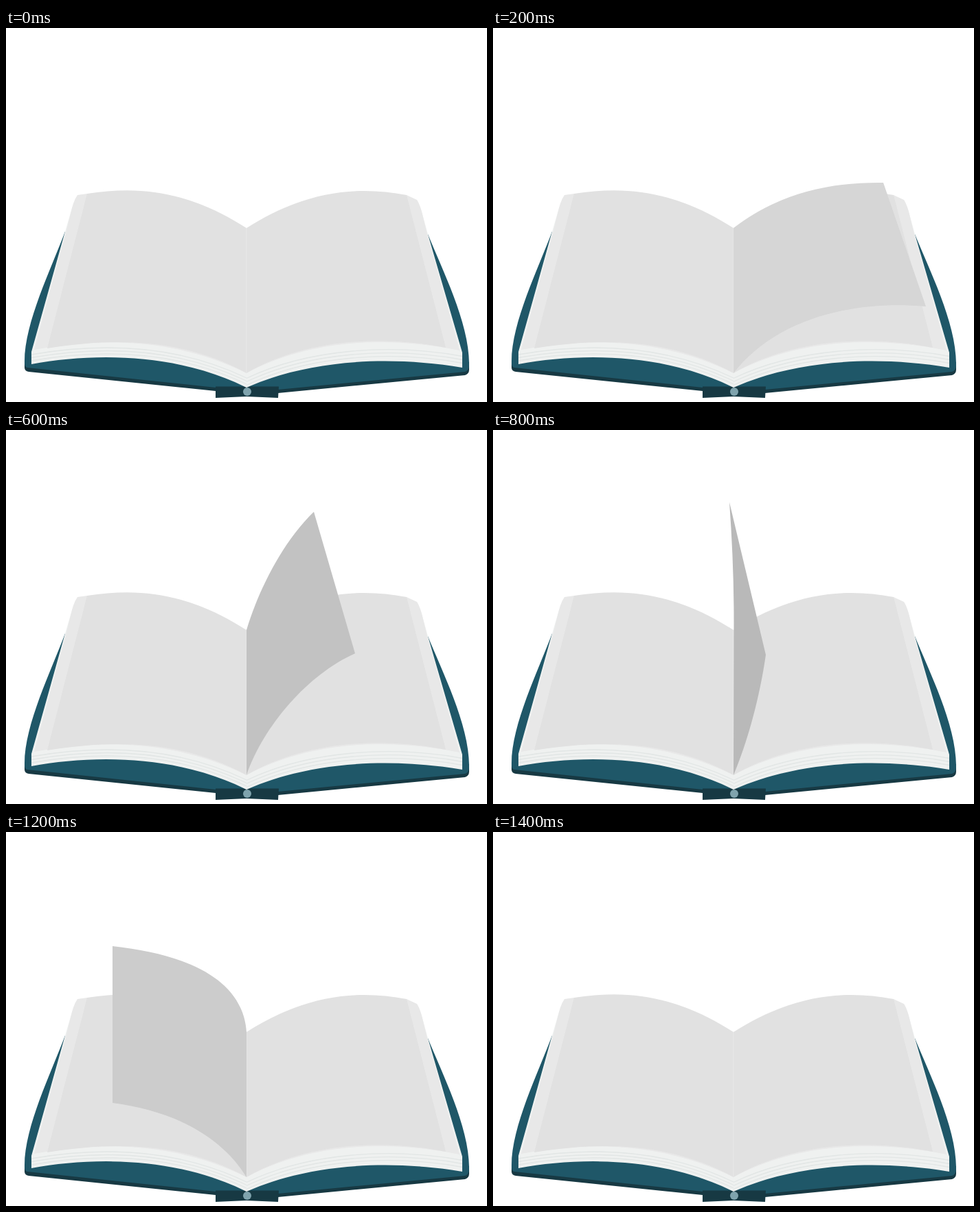
These frames come from a looping animation (700x544 px, 1600 ms). An HTML page without scripts:

```html
<!DOCTYPE html>
<html lang="en">
<head>
<meta charset="utf-8">
<title>Turning page</title>
<style>
  html, body { margin: 0; width: 100%; height: 100%; overflow: hidden; background: #fff; }
  svg { display: block; width: 100%; height: 100%; }
  .cover { fill: #1f5768; }
  .board { fill: #173943; }
  .stack { fill: #eff1f0; }
  .rim { fill: #e8e8e8; }
  .page { fill: #e1e1e1; }
  .line { fill: none; stroke: #e2e6e5; stroke-width: 1.3; }
  .leaf path {
    visibility: hidden;
    animation: flash 1600ms step-end calc(var(--i) * 200ms) infinite;
  }
  @keyframes flash {
    0% { visibility: visible; }
    12.5%, 100% { visibility: hidden; }
  }
</style>
</head>
<body>
<svg viewBox="0 0 700 544">
  <defs>
    <path id="lineL" d="M37 471C140 453 250 457 350 505"/>
    <path id="lineR" d="M350 505C440 462 560 454 664 473"/>
  </defs>

  <!-- cover -->
  <path class="board" d="M27 486V494Q27 499 33 500L305 528H350L396 531L668 505Q674 503 674 497V486L350 510Z"/>
  <path class="cover" d="M86 296C66 350 26 430 27 487Q27 493 31 494L305 523L396 526L668 500Q674 498 674 490C675 430 634 350 614 300L560 420H130Z"/>
  <path class="board" d="M305 521.500H397L396 538L350 536L305 538Z"/>
  <circle cx="351" cy="529" r="6" fill="#7fa3ad"/>

  <!-- left half -->
  <path class="stack" d="M104 243L96 262L86 296L37 471V489C130 472 250 473 350 523V400Z"/>
  <g class="line">
    <use href="#lineL" y="4"/>
    <use href="#lineL" y="8.5"/>
    <use href="#lineL" y="13"/>
  </g>
  <path class="rim" d="M118 241L104 243Q99 250 96 262L87 298L41 468C140 449 250 452 350 502V400Z"/>
  <path class="page" d="M118 241C200 228 270 240 350 291V502C260 452 160 450 60 466Z"/>

  <!-- right half -->
  <path class="stack" d="M598 250L605 267L614 300L664 472V494C555 476 440 483 350 523V400Z"/>
  <g class="line">
    <use href="#lineR" y="4.5"/>
    <use href="#lineR" y="9.5"/>
    <use href="#lineR" y="14.5"/>
  </g>
  <path class="rim" d="M583 243L598 250Q602 256 605 267L613 300L660 469C550 447 440 454 350 502V400Z"/>
  <path class="page" d="M350 291C430 240 505 228 583 243L640 465C540 445 430 455 350 502Z"/>

  <path d="M350 291V502" stroke="#e8e8e8"/>

  <!-- turning leaf, one pose per step -->
  <g class="leaf">
    <path style="--i:1" fill="#d6d6d6" d="M350 291C410 245 480 224 568 225L630 405C520 395 410 425 350 502Z"/>
    <path style="--i:2" fill="#ccc" d="M350 291C390 226 460 190 538 169L602 346C470 337 385 425 350 502Z"/>
    <path style="--i:3" fill="#c2c2c2" d="M350 291C365 240 400 165 448 119L508 325C440 355 375 430 350 502Z"/>
    <path style="--i:4" fill="#b9b9b9" d="M350.5 291Q351 200 344 105L397 327C388 390 370 455 350 502Z"/>
    <path style="--i:5" fill="#c1c1c1" d="M350 291C349 230 315 162 230 102L205 368C275 410 325 460 350 502Z"/>
    <path style="--i:6" fill="#ccc" d="M350 291C345 215 265 178 155 166V394C240 405 312 440 350 502Z"/>
  </g>
</svg>
</body>
</html>
```
